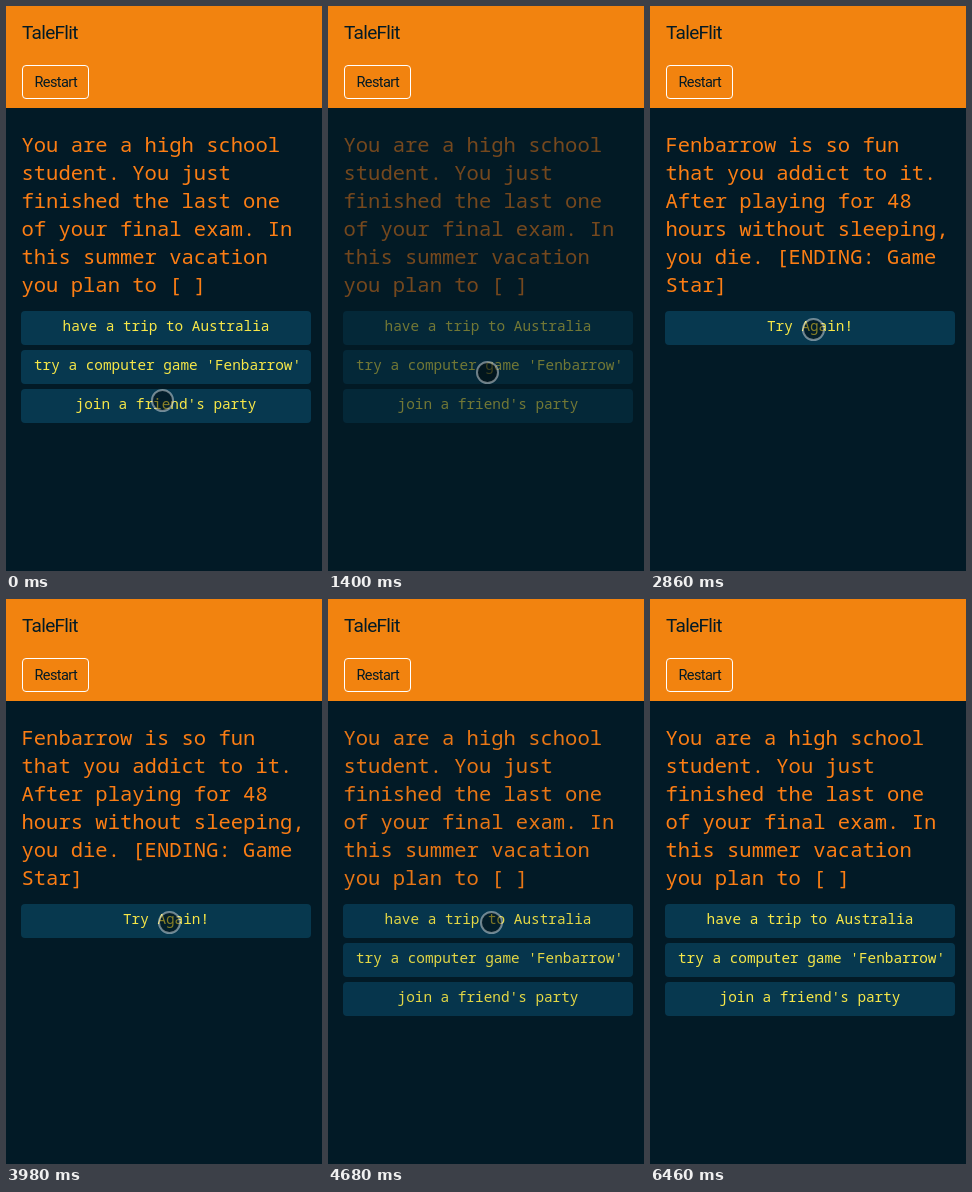
Write an HTML page with a canvas that moves like this. It is 316 px wide and 565 px high and loops after 7.25 s.

```html
<!DOCTYPE html>
<html lang="en">
<head>
<meta charset="utf-8">
<title>Text adventure</title>
<style>
  html, body { margin: 0; width: 100%; height: 100%; overflow: hidden; background: #021a26; }
  canvas { display: block; }
</style>
</head>
<body>
<canvas id="stage" width="316" height="565"></canvas>
<script>
const WIDTH = 316, HEIGHT = 565, HEADER = 102, LOOP = 7250;
const FADE = 400, TICK = 140, POINTER_LEAVES = 6460;
const ctx = document.getElementById('stage').getContext('2d');

const COLOR = {
  back: '#021a26', header: '#f2830f', story: '#fd7e14',
  button: '#07384f', label: '#f8e848',
};
const FONT = {
  title: '400 19px Roboto, sans-serif',
  restart: '400 14.5px Roboto, sans-serif',
  story: "500 20.53px 'Noto Sans Mono', monospace",
  label: "500 14.37px 'Noto Sans Mono', monospace",
};

const question = {
  story: ['You are a high school', 'student. You just', 'finished the last one',
    'of your final exam. In', 'this summer vacation', 'you plan to [ ]'],
  choices: ['have a trip to Australia', "try a computer game 'Fenbarrow'", "join a friend's party"],
};
const ending = {
  story: ['Fenbarrow is so fun', 'that you addict to it.', 'After playing for 48',
    'hours without sleeping,', 'you die. [ENDING: Game', 'Star]'],
  choices: ['Try Again!'],
};

const swing = p => (1 - Math.cos(p * Math.PI)) / 2;
const easeOut = p => 1 - (1 - p) ** 3;
const progress = (time, start, length) => Math.min(1, Math.max(0, (time - start) / length));

const taps = [{ at: 1180, next: ending }, { at: 3955, next: question }];
const home = { x: 156.5, y: 394.5 };
const moves = [
  { at: 0, length: 820, x: 159.5, y: 366.5, ease: swing },
  { at: 2100, length: 700, x: 163.5, y: 323.5, ease: easeOut },
  { at: 5320, length: 480, x: 167.5, y: 343.5, ease: easeOut },
  { at: 5855, length: 330, x: 246.5, y: 542.5, ease: swing },
];

// The screen refreshes in ticks, counted anew from the start of each burst of activity.
const bursts = [0, 1250, 3980, 5390];
function snap(time) {
  const start = bursts.findLast(burst => burst <= time);
  return start + Math.floor((time - start) / TICK) * TICK;
}

function pageAt(time) {
  const tap = taps.findLast(({ at }) => at <= time);
  if (!tap) return [question, 1];
  const shown = time - tap.at - FADE;
  if (shown >= 0) return [tap.next, swing(progress(shown, 0, FADE))];
  const previous = tap.next === ending ? question : ending;
  return [previous, 1 - swing(progress(time, tap.at, FADE))];
}

function pointerAt(time) {
  let { x, y } = home;
  for (const move of moves) {
    const p = move.ease(progress(time, move.at, move.length));
    x += (move.x - x) * p;
    y += (move.y - y) * p;
  }
  return [x, y];
}

function roundRect(x, y, w, h, radius) {
  ctx.beginPath();
  ctx.roundRect(x, y, w, h, radius);
}

function text(value, x, y, font, color, spacing = '0px') {
  ctx.font = font;
  ctx.letterSpacing = spacing;
  ctx.fillStyle = color;
  ctx.fillText(value, x, y);
}

function drawHeader() {
  ctx.fillStyle = COLOR.header;
  ctx.fillRect(0, 0, WIDTH, HEADER);
  text('TaleFlit', 16, 33, FONT.title, COLOR.back, '-0.7px');
  roundRect(16.5, 59.5, 66, 33, 3.5);
  ctx.strokeStyle = '#fff';
  ctx.lineWidth = 1;
  ctx.stroke();
  text('Restart', 28.5, 81, FONT.restart, COLOR.back, '-0.6px');
}

function drawChoice(choice, y) {
  roundRect(15, y, 290, 34, 4);
  ctx.fillStyle = COLOR.button;
  ctx.fill();
  ctx.font = FONT.label;
  ctx.letterSpacing = '0px';
  // Centred, but never left of the button's padding.
  const x = Math.max(28, 160 - ctx.measureText(choice).width / 2);
  text(choice, x, y + 20, FONT.label, COLOR.label);
}

function drawPage({ story, choices }, opacity) {
  story.forEach((line, i) => text(line, 15.5, 146 + i * 28, FONT.story, COLOR.story));
  choices.forEach((choice, i) => drawChoice(choice, 305 + i * 39));
  // Veil the whole page so overlapping parts fade as one group.
  ctx.globalAlpha = 1 - opacity;
  ctx.fillStyle = COLOR.back;
  ctx.fillRect(0, HEADER, WIDTH, HEIGHT - HEADER);
  ctx.globalAlpha = 1;
}

function drawPointer(x, y) {
  ctx.beginPath();
  ctx.arc(x, y, 10.5, 0, Math.PI * 2);
  ctx.fillStyle = 'rgba(0, 0, 0, .45)';
  ctx.fill();
  ctx.strokeStyle = 'rgba(255, 255, 255, .43)';
  ctx.lineWidth = 2;
  ctx.stroke();
}

function draw(time) {
  const tick = snap(time);
  ctx.fillStyle = COLOR.back;
  ctx.fillRect(0, 0, WIDTH, HEIGHT);
  drawPage(...pageAt(tick));
  drawHeader();
  if (time < POINTER_LEAVES) drawPointer(...pointerAt(tick));
}

const startTime = performance.now();
function animate() {
  draw((performance.now() - startTime) % LOOP);
  requestAnimationFrame(animate);
}
animate();
</script>
</body>
</html>
```
